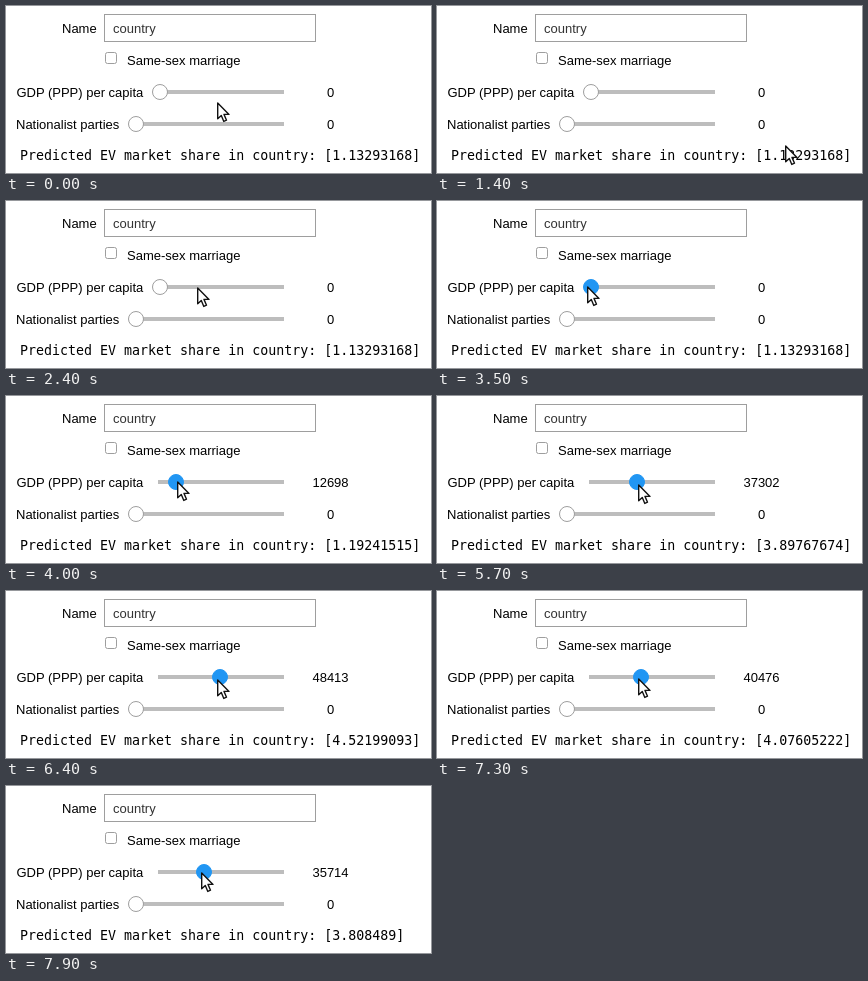
An HTML page for the animation above (8000 ms loop, 425 px wide and 167 px high).

```html
<!DOCTYPE html>
<html lang="en">
<head>
<meta charset="utf-8">
<title>Prediction widget</title>
<style>
  html, body { margin: 0; width: 100%; height: 100%; overflow: hidden; background: #fff; }
  svg { display: block; }
  text { font: 13px "Liberation Sans", Arial, sans-serif; white-space: pre; }
  .output { font: 13.3px "DejaVu Sans Mono", monospace; }
  .middle { text-anchor: middle; }
  .track { fill: #bdbdbd; }
  .knob { fill: #fff; stroke: #9e9e9e; }
  .knob.active { fill: #2196f3; stroke: #2196f3; }
  .box { fill: #fff; stroke: #9e9e9e; }
</style>
</head>
<body>
<svg width="425" height="167" viewBox="0 0 425 167">
  <text x="56" y="27">Name</text>
  <rect class="box" x="98.5" y="8.5" width="211" height="27"/>
  <text x="107" y="27" fill="#333">country</text>

  <rect class="box" x="99.5" y="46.5" width="11" height="11" rx="2"/>
  <text x="121" y="59">Same-sex marriage</text>

  <text x="10.4" y="91">GDP (PPP) per capita</text>
  <rect class="track" x="152" y="84" width="126" height="4"/>
  <circle class="knob" id="knob" cx="154" cy="86" r="7.5"/>
  <text class="middle" id="gdp" x="324.5" y="91">0</text>

  <text x="10" y="123">Nationalist parties</text>
  <rect class="track" x="128" y="116" width="150" height="4"/>
  <circle class="knob" cx="130" cy="118" r="7.5"/>
  <text class="middle" x="324.5" y="123">0</text>

  <text class="output" id="output" x="14" y="154"></text>
  <path id="cursor" fill="#fff" stroke="#111" stroke-width="1.4" stroke-linejoin="round"
        d="M.7 .9V16.8L4.3 13.4L6.8 19.4L9.5 18.2L7 12.4H12Z"/>
</svg>
<script>
const LOOP = 8000, TICK = 100, SLIDER_STEPS = 126;

// The pointer visits the result, then hovers over the knob and drags it in three pulls and a return.
const HOVER = 2900;
const moves = [
  { from: 700, to: 1200, x: 362, y: 150, step: 0 },
  { from: 1300, to: 1400, x: 348, y: 139, step: 0 },
  { from: 1500, to: 2200, x: 191, y: 86, step: 0 },
  { from: HOVER, to: HOVER, x: 150, y: 85, step: 0 },
  { from: 3700, to: 4000, x: 171, y: 85, step: 16 },
  { from: 4200, to: 4900, x: 190, y: 87, step: 32 },
  { from: 5100, to: 6400, x: 211, y: 88, step: 61 },
  { from: 6700, to: 7700, x: 195, y: 86, step: 45 },
];

// Key points of the predicted share along the slider
const shares = [[0, 1.13293168], [16, 1.19241515], [32, 2.50045208], [45, 3.808489], [61, 4.52199093]];

const [knob, gdp, output, cursor] =
  ["knob", "gdp", "output", "cursor"].map(id => document.getElementById(id));

const mix = (a, b, p) => a + (b - a) * p;

function stateAt(time) {
  let state = { x: 211, y: 96, step: 0 };
  for (const move of moves) {
    if (time < move.from) break;
    const progress = Math.min(1, (time - move.from + TICK) / (move.to - move.from + TICK));
    const blend = key => Math.round(mix(state[key], move[key], progress));
    state = { x: blend("x"), y: blend("y"), step: blend("step") };
  }
  return state;
}

function shareAt(step) {
  const i = Math.max(1, shares.findIndex(([s]) => step <= s));
  const [s0, v0] = shares[i - 1], [s1, v1] = shares[i];
  return +mix(v0, v1, (step - s0) / (s1 - s0)).toFixed(8);
}

function draw(elapsed) {
  const time = Math.floor(elapsed % LOOP / TICK) * TICK;
  const { x, y, step } = stateAt(time);
  const ratio = step / SLIDER_STEPS;
  knob.setAttribute("cx", Math.round(154 + ratio * 124));
  knob.classList.toggle("active", time >= HOVER);
  gdp.textContent = Math.round(ratio * 100000);
  output.textContent = `Predicted EV market share in country: [${shareAt(step)}]`;
  cursor.setAttribute("transform", `translate(${x} ${y})`);
}

const start = performance.now();
function frame() {
  draw(performance.now() - start);
  requestAnimationFrame(frame);
}
frame();
</script>
</body>
</html>
```
